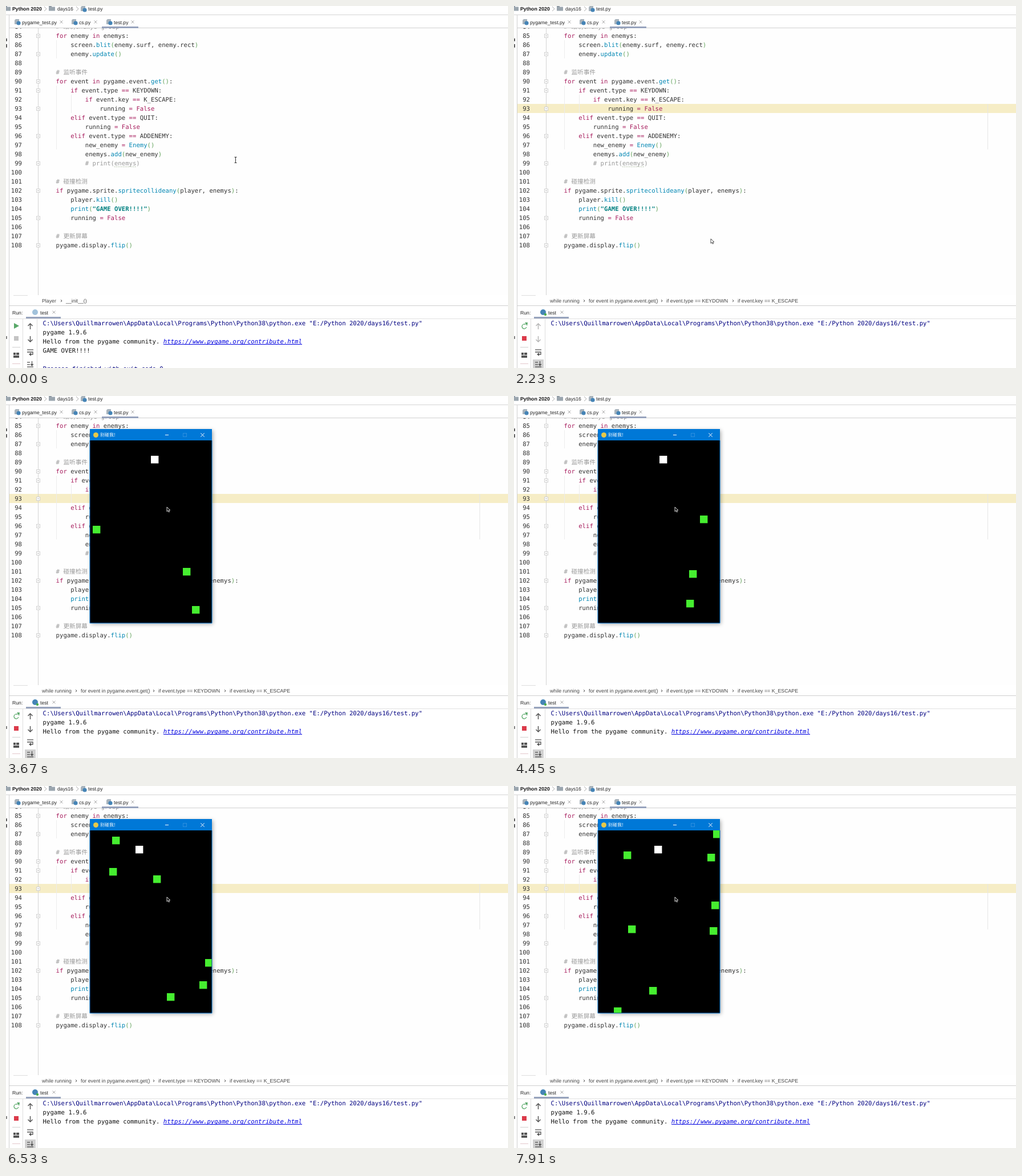
An HTML page with a canvas for the animation above (8 s loop, 880 by 636 pixels).

```html
<!DOCTYPE html>
<html lang="en">
<head>
<meta charset="utf-8">
<title>Editor and game window</title>
<style>
html, body { margin: 0; width: 100%; height: 100%; overflow: hidden; background: #fff; }
canvas { display: block; }
</style>
</head>
<body>
<canvas id="stage" width="880" height="636"></canvas>
<script>
const ctx = document.getElementById('stage').getContext('2d');
const LOOP = 8000, CHAR = 6.4;
const MONO = '10.63px "DejaVu Sans Mono", "Noto Sans CJK SC", monospace';
const UI = '8.67px "Liberation Sans", Arial, sans-serif';
const CRUMB = '8.8px "Liberation Sans", Arial, sans-serif';
const CJK = '8px "Noto Sans CJK SC", "Noto Sans CJK", sans-serif';

// Screen updates: [first, last, count], evenly spaced on a 30 ms clock
const STEPS = [[150, 1080, 8], [1230, 1800, 5], [2230, 3250, 9], [3400, 4300, 8],
  [4450, 5380, 8], [5530, 6530, 8], [6680, 7640, 8], [7760, 7910, 2]];
const T = { click: 1080, menu: 1230, run: 2230, hello: 2480, open: 2600, ready: 2860, move: 3400 };

const CODE = `# 绘制enemys group
for enemy in enemys:
    screen.blit(enemy.surf, enemy.rect)
    enemy.update()

# 监听事件
for event in pygame.event.get():
    if event.type == KEYDOWN:
        if event.key == K_ESCAPE:
            running = False
    elif event.type == QUIT:
        running = False
    elif event.type == ADDENEMY:
        new_enemy = Enemy()
        enemys.add(new_enemy)
        # print(enemys)

# 碰撞检测
if pygame.sprite.spritecollideany(player, enemys):
    player.kill()
    print("GAME OVER!!!!")
    running = False

# 更新屏幕
pygame.display.flip()`.split('\n');
const TOKEN = /(#.*)|("[^"]*")|(\b(?:for|in|if|elif|False)\b|==?)|(\w+(?=\())|([()])|([^\s()=]+?(?=\b|\W|$))/g;
const TOKEN_COLORS = ['#999', '#008080', '#a71d5d', '#0086b3', '#63a35c', '#333'];
const FOLDS = [85, 87, 90, 91, 93, 96, 99, 102, 105, 108];

// [y, label with & before the underlined letter, shortcut, icon]
const MENU = [
  [197, 'Show Context Actions', 'Alt+Enter', 'bulb'],
  [218, 'Cop&y Reference', 'Ctrl+Alt+Shift+C'],
  [236, '&Paste', 'Ctrl+V', 'clip'],
  [254, 'Past&e from History…', 'Ctrl+Shift+V'],
  [272, 'Paste &without Formatting', 'Ctrl+Alt+Shift+V'],
  [290, 'Column Selection &Mode', 'Alt+Shift+Insert'],
  [310, 'Find &Usages', 'Alt+F7'],
  [328, '&Refactor', '>'],
  [349, 'Folding', '>'],
  [370, 'Go To', '>'],
  [388, 'Generate…', 'Alt+Insert'],
  [408, 'R&un \'test\'', 'Ctrl+Shift+F10', 'play'],
  [426, '&Debug \'test\'', '', 'bug'],
  [444, 'Run \'test\' with Co&verage', '', 'shield'],
  [462, '&Profile \'test\'', '', 'clock'],
  [480, '&Concurrency Diagram for \'test\'', '', 'rows'],
  [501, 'Edit \'test\'…', '', 'dot'],
  [522, 'Show in Explorer'],
  [540, 'File &Path', 'Ctrl+Alt+F12'],
  [558, 'Open in Terminal', '', 'term'],
  [578, 'Local &History', '>'],
  [599, 'Execute Line in Python Console', 'Alt+Shift+E'],
  [617, 'Run File in P&ython Console', '', 'dot'],
  [635, 'Compare with Clip&board', '', 'clip']
];
const RULES = [207, 299, 338, 359, 397, 490, 511, 568, 588];

const POINTER = [[0, 402, 270], [150, 402, 270], [1080, 301, 186], [1230, 307, 192], [1800, 345, 409],
  [2230, 345, 409], [2740, 243, 150], [3250, 282, 195]];
const PLAYER = [[3670, 254], [5260, 257], [6530, 227], [7910, 246]];
// [x, spawn slot, rising speed in px/ms]
const ENEMIES = [[152, 0, .272], [310, 1.4, .333], [326, 2, .204], [307, 4, .208], [302, 5, .2],
  [198, 6, .26], [198, 7, .2895], [310, 8, .333], [181, 9, .1947], [186, 10, .29],
  [258, 11, .2924], [349, 12, .1625], [339, 13, .1615], [282, 14, .33], [192, 15, .2265],
  [346, 16, .1935], [343, 17, .1956], [200, 18, .29], [237, 19, .1586], [175, 20, .2]];
const spawnTime = slot => 3041 + 241 * slot;

function held(t) {
  let last = 0;
  for (const [a, b, n] of STEPS) {
    for (let k = 0; k < n; k++) {
      const at = a + Math.round((b - a) * k / (n - 1) / 30) * 30;
      if (t < at) return last;
      last = at;
    }
  }
  return last;
}

function along(keys, t, ease = u => u) {
  let i = 0;
  while (i < keys.length - 2 && t >= keys[i + 1][0]) i++;
  const [a, b] = [keys[i], keys[i + 1]];
  const u = ease(Math.max(0, Math.min(1, (t - a[0]) / (b[0] - a[0]))));
  return a.slice(1).map((v, k) => v + (b[k + 1] - v) * u);
}
const smooth = u => u * u * (3 - 2 * u);

function box(x, y, w, h, color) {
  ctx.fillStyle = color;
  ctx.fillRect(x, y, w, h);
}
function frame(x, y, w, h, color) {
  ctx.strokeStyle = color;
  ctx.lineWidth = 1;
  ctx.strokeRect(x + .5, y + .5, w - 1, h - 1);
}
function line(color, width, ...p) {
  ctx.strokeStyle = color;
  ctx.lineWidth = width;
  ctx.beginPath();
  for (let i = 0; i < p.length; i += 2) ctx.lineTo(p[i], p[i + 1]);
  ctx.stroke();
}
function poly(color, ...p) {
  ctx.fillStyle = color;
  ctx.beginPath();
  for (let i = 0; i < p.length; i += 2) ctx.lineTo(p[i], p[i + 1]);
  ctx.fill();
}
function dot(x, y, r, color) {
  ctx.fillStyle = color;
  ctx.beginPath();
  ctx.arc(x, y, r, 0, 7);
  ctx.fill();
}
function ring(x, y, r, color, from = 0, to = 7) {
  ctx.strokeStyle = color;
  ctx.lineWidth = 1.3;
  ctx.beginPath();
  ctx.arc(x, y, r, from, to);
  ctx.stroke();
}
function text(s, x, y, color = '#222', font = UI, align = 'left') {
  ctx.font = font;
  ctx.fillStyle = color;
  ctx.textAlign = align;
  ctx.fillText(s, x, y);
}
const cross = (x, y, r, color) => {
  line(color, 1, x - r, y - r, x + r, y + r);
  line(color, 1, x - r, y + r, x + r, y - r);
};
const chevron = (x, y, r, color) => line(color, 1, x - r / 2, y - r, x + r / 2, y, x - r / 2, y + r);

function pyFile(x, y) {
  poly('#a9b4bd', x - 3, y - 5, x + 3, y - 5, x + 3, y + 4, x - 5, y + 4, x - 5, y - 3);
  dot(x + 2, y + 2, 3.6, '#4584b6');
}
function folder(x, y) {
  box(x, y, 5, 2, '#8f9aa3');
  box(x, y + 1.5, 11, 7, '#9aa5ae');
}

function drawTop() {
  folder(-3, 0);
  text('Python 2020', 11, 8, '#111', 'bold ' + CRUMB);
  chevron(69, 5, 4, '#aaa');
  folder(75, 0);
  text('days16', 90, 8);
  chevron(125, 5, 4, '#aaa');
  pyFile(136, 5);
  text('test.py', 144, 8);
  line('#d5d5d5', 1, 0, 15.5, 880, 15.5);
  for (const [x, name, close] of [[20, 'pygame_test.py', 97], [120, 'cs.py', 157], [181, 'test.py', 222]]) {
    pyFile(x, 28);
    text(name, x + 8, 32);
    cross(close, 28, 2.5, '#aaa');
  }
  line('#d0d0d0', 1, 6, 38.5, 880, 38.5);
  box(168, 36, 64, 3, '#97a3bd');
}

function drawEditor(t) {
  const active = t >= T.click;
  box(6, 39, 874, 469, '#fefefe');
  if (active) {
    box(6, 172, 874, 16, '#f6edc6');
    line('#e6e6e6', 1, 830.5, 172, 830.5, 252);
  }
  line('#d4d4d4', 1, 56.5, 39, 56.5, 508);
  for (const [x, y, y2] of [[88.5, 140, 252], [114.5, 156, 188], [88.5, 60, 92]]) line('#ececec', 1, x, y, x, y2);
  ctx.save();
  ctx.beginPath();
  ctx.rect(6, 39, 874, 469);
  ctx.clip();
  CODE.forEach((src, i) => {
    const y = 40 + i * 16;
    text(84 + i, 28, y, '#333', MONO, 'right');
    for (const m of src.matchAll(TOKEN)) {
      const kind = m.slice(1).findIndex(g => g !== undefined);
      text(m[0], 87.6 + m.index * CHAR, y, TOKEN_COLORS[kind], (kind === 1 ? 'bold ' : '') + MONO);
    }
  });
  ctx.setLineDash([1.5, 1.5]);
  line('#a9b99c', 1, 190, 282.5, 228, 282.5);
  ctx.setLineDash([]);
  for (const n of FOLDS) {
    const y = 52 + (n - 85) * 16;
    box(53, y - 3, 7, 7, '#fff');
    frame(53, y - 3, 7, 7, '#d0d0d0');
    line('#bbb', 1, 55, y + .5, 58, y + .5);
  }
  ctx.restore();

  line('#ddd', 1, 13, 508.5, 38, 508.5);
  const crumbs = active
    ? [[63, 'while running'], [131, 'for event in pygame.event.get()'], [267, 'if event.type == KEYDOWN'], [392, 'if event.key == K_ESCAPE']]
    : [[63, 'Player'], [105, '__init__()']];
  crumbs.forEach(([x, s], i) => {
    text(s, x, 521, '#444', CRUMB);
    if (i) chevron(x - 8, 518, 2, '#444');
  });
}

function arrow(y, dir, color) {
  line(color, 1.5, 42.5, y - 5, 42.5, y + 5);
  line(color, 1.5, 38.5, y + dir, 42.5, y + 5 * dir, 46.5, y + dir);
}

function drawConsole(t) {
  const running = t >= T.run;
  line('#cfcfcf', 1, 6, 526.5, 880, 526.5);
  text('Run:', 11, 542);
  dot(51, 538, 5, running ? '#4584b6' : '#a2c2db');
  if (running) dot(55, 542, 2.2, '#4caf50');
  text('test', 60, 542);
  cross(84, 538, 2.5, '#aaa');
  line('#e0e0e0', 1, 6, 549.5, 880, 549.5);
  box(35, 546, 61, 3, '#97a3bd');
  line('#ddd', 1, 29.5, 550, 29.5, 636);
  line('#ddd', 1, 54.5, 550, 54.5, 636);

  if (running) {
    ring(18, 563, 4, '#59a869', .3, 5.3);
    poly('#59a869', 19, 556, 24, 556, 23, 562);
  } else poly('#59a869', 14, 557, 23, 562, 14, 567);
  box(14, 580, 8, 8, running ? '#db3b4b' : '#c4c4c4');
  line('#d0d0d0', 1, 11, 599.5, 25, 599.5);
  for (const [x, y, w] of [[13, 609, 4], [18, 609, 5], [13, 614, 10]]) box(x, y, w, 4, '#555');
  line('#e3c7cb', 1, 11, 628.5, 25, 628.5);
  const tone = running && t < 3250 ? '#b5b5b5' : '#555';
  arrow(563, -1, tone);
  arrow(585, 1, tone);
  line('#555', 1.3, 37, 604, 48, 604);
  line('#555', 1.3, 37, 608, 47, 608, 47, 612, 42, 612);
  poly('#555', 44, 609, 44, 615, 40, 612);
  if (running) box(33, 621, 19, 15, '#d0d0d0');
  line('#555', 1.3, 37, 626, 42, 626);
  line('#555', 1.3, 37, 630, 42, 630);
  line('#555', 1.3, 37, 634, 48, 634);
  line('#555', 1.3, 45.5, 624, 45.5, 631);
  poly('#555', 42.5, 629, 48.5, 629, 45.5, 633);

  const put = (s, y, color = '#111', col = 0, style = '') => text(s, 64.6 + col * CHAR, y, color, style + MONO);
  put('C:\\Users\\Quillmarrowen\\AppData\\Local\\Programs\\Python\\Python38\\python.exe "E:/Python 2020/days16/test.py"', 561, '#000080');
  if (!running || t >= T.hello) {
    put('pygame 1.9.6', 577);
    put('Hello from the pygame community.', 593);
    put('https://www.pygame.org/contribute.html', 593, '#0000e0', 33, 'italic ');
    line('#0000e0', 1, 276, 594.5, 519, 594.5);
  }
  if (!running) {
    put('GAME OVER!!!!', 609);
    put('Process finished with exit code 0', 641, '#000080');
  }
}

const ICONS = {
  bulb(y) { dot(312, y - 2, 4, '#555'); box(310, y + 2, 4, 4, '#555'); },
  clip(y) { frame(308, y - 4, 8, 9, '#666'); box(310, y - 5, 4, 3, '#666'); },
  play(y) { poly('#59a869', 308, y - 5, 317, y, 308, y + 5); },
  bug(y) {
    dot(312, y + 1, 4, '#59a869');
    for (const d of [-3, 1, 4]) line('#59a869', 1, 307, y + d, 317, y + d);
  },
  shield(y) { poly('#666', 307, y - 5, 315, y - 5, 315, y + 1, 311, y + 5, 307, y + 1); mini(y); },
  clock(y) { ring(311, y - 1, 4, '#666'); line('#666', 1, 311, y - 3, 311, y, 313, y); mini(y); },
  rows(y) { for (const d of [-4, 0, 4]) line('#666', 1.3, 307, y + d, 314, y + d); mini(y); },
  dot(y) { dot(312, y, 5, '#4584b6'); },
  term(y) { box(307, y - 4, 10, 8, '#555'); chevron(310, y, 2, '#fff'); }
};
const mini = y => poly('#59a869', 312, y - 1, 318, y + 2.5, 312, y + 6);

function drawMenu(t, hoverY) {
  box(267, 188, 36, 320, 'rgba(0,0,0,.035)');
  box(302, 187, 221, 449, '#f2f2f2');
  line('#b4b4b4', 1, 302.5, 636, 302.5, 187.5, 522.5, 187.5, 522.5, 636);
  for (const y of RULES) line('#c9c9c9', 1, 303, y - .5, 522, y - .5);
  for (const [y, label, keys, icon] of MENU) {
    const hot = t > T.menu && Math.abs(hoverY - y) < 9;
    const ink = hot ? '#fff' : '#111';
    if (hot) box(303, y - 9, 219, 18, '#2675bf');
    const [before, after] = label.split('&');
    text(before + (after || ''), 323, y + 3, ink);
    if (after) {
      const x = 323 + ctx.measureText(before).width;
      line(ink, .7, x, y + 4.5, x + ctx.measureText(after[0]).width, y + 4.5);
    }
    if (keys === '>') chevron(515, y, 3, '#555');
    else if (keys) text(keys, 513, y + 3, hot ? '#fff' : '#555', UI, 'right');
    if (icon) ICONS[icon](y);
  }
}

function drawGame(t) {
  const opening = t < T.ready;
  ctx.save();
  if (t < T.move) ctx.translate(-22, -4);
  if (opening) {
    const u = (t - T.open) / (T.ready - T.open);
    const zoom = .96 + .039 * u;
    ctx.globalAlpha = .48 + .35 * u;
    ctx.translate(254, 228.5);
    ctx.scale(zoom, zoom);
    ctx.translate(-254, -228.5);
  } else {
    ctx.shadowColor = 'rgba(0,0,0,.35)';
    ctx.shadowBlur = 7;
    ctx.shadowOffsetX = ctx.shadowOffsetY = 1.5;
    box(147, 58, 214, 341, '#000');
    ctx.shadowColor = 'transparent';
  }
  // Title bar and body stay apart so that neither shows through the other
  box(147, 58, 214, 20, '#0078d7');
  box(147, 78, 214, 321, '#000');
  line('#0078d7', 1, 147, 78, 147, 399, 361, 399, 361, 78);
  if (opening) {
    box(153, 64, 8, 8, '#e8f2fb');
    text('pygame window', 165, 71, '#cfe5f7');
  } else {
    dot(157.5, 68.5, 4.5, '#e6c84a');
    text('别碰我!', 165, 71, '#fff', CJK);
  }
  line('#fff', 1, 279, 68.5, 285, 68.5);
  frame(310, 65, 7, 7, '#2d8fdf');
  cross(344.5, 68.5, 3.2, '#fff');
  if (!opening) {
    ctx.beginPath();
    ctx.rect(147.5, 78, 213, 320.5);
    ctx.clip();
    for (const [x, slot, speed] of ENEMIES) {
      const age = t - spawnTime(slot);
      if (age > 0) box(x, Math.round(399 - speed * age), 13.4, 13.4, '#46ee30');
    }
    box(Math.round(along(PLAYER, t)[0]), 105, 13.4, 13.4, '#fff');
  }
  ctx.restore();
}

function drawPointer(t, x, y) {
  if (t < T.menu) {
    line('#333', 1, x + .5, y - 4, x + .5, y + 5);
    line('#333', 1, x - 1.5, y - 4.5, x + 2.5, y - 4.5);
    line('#333', 1, x - 1.5, y + 5.5, x + 2.5, y + 5.5);
    return;
  }
  const [fill, edge] = t < T.open ? ['#fff', '#222'] : ['#111', '#fff'];
  const shape = [0, 0, 0, 8, 2, 6.3, 3.3, 9, 4.6, 8.4, 3.4, 5.8, 5.8, 5.6, 0, 0].map((v, i) => v + (i % 2 ? y : x));
  poly(fill, ...shape);
  line(edge, .8, ...shape);
}

function draw(t) {
  ctx.textRendering = 'geometricPrecision';
  box(0, 0, 880, 636, '#fff');
  drawTop();
  drawEditor(t);
  drawConsole(t);
  line('#cfcfcf', 1, 5.5, 16, 5.5, 636);
  box(0, 57, 2, 5, '#666');
  box(0, 67, 2, 6, '#666');
  box(0, 580, 2, 5, '#888');
  const [x, y] = along(POINTER, t, smooth).map(Math.round);
  if (t >= T.menu && t < T.run) drawMenu(t, y);
  if (t >= T.open) drawGame(t);
  drawPointer(t, x, y);
}

let shown = -1;
const start = performance.now();
function tick(now) {
  const t = held(Math.max(0, now - start) % LOOP);
  if (t !== shown) draw(shown = t);
  requestAnimationFrame(tick);
}
tick(start);
</script>
</body>
</html>
```
